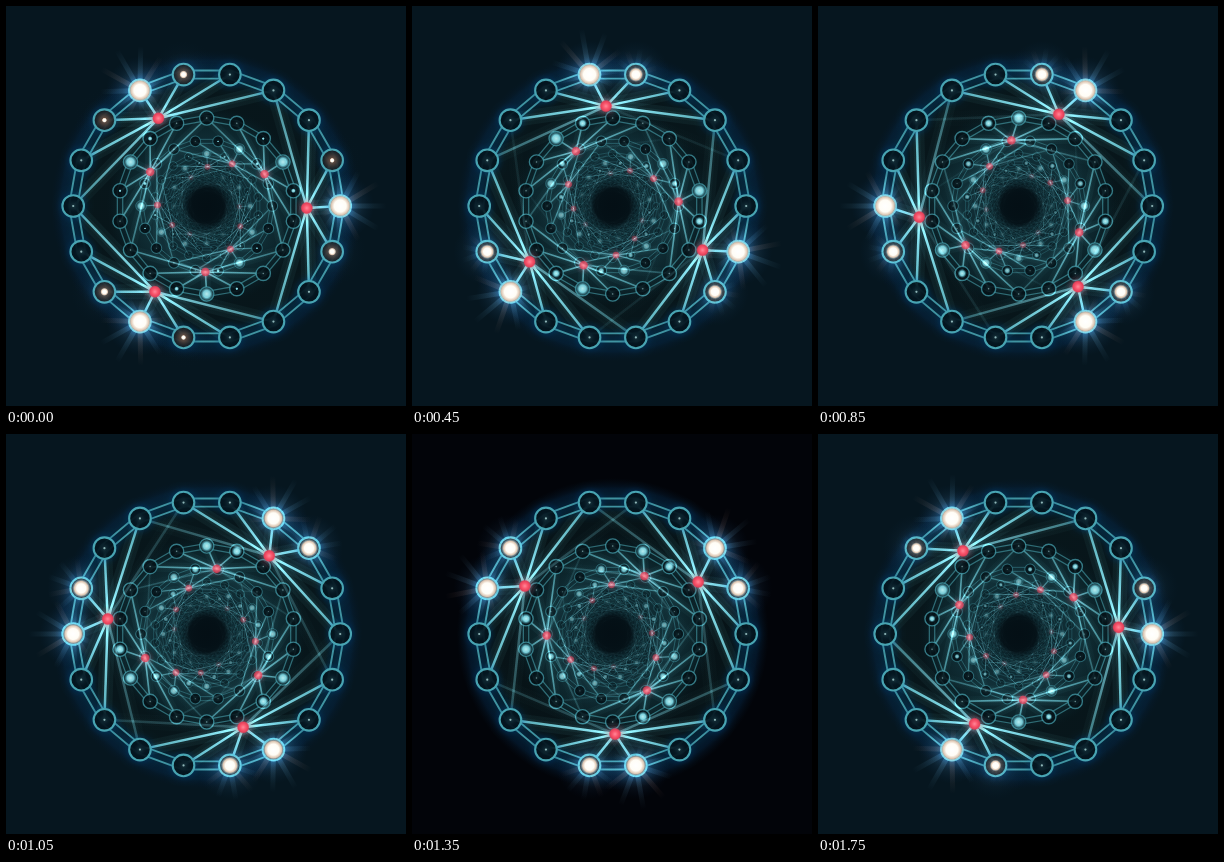
An HTML page with a canvas that plays this animation: 400x400 px, repeating every 1.8 s.

```html
<!DOCTYPE html>
<html lang="en">
<head>
<meta charset="utf-8">
<title>Node tunnel</title>
<style>
html, body { margin: 0; width: 100%; height: 100%; overflow: hidden; background: #07161f; }
canvas { display: block; width: 400px; height: 400px; }
</style>
</head>
<body>
<canvas id="stage" width="400" height="400"></canvas>
<script>
const ctx = document.getElementById('stage').getContext('2d');
const LOOP = 1800, STEP = 50, RINGS = 12, NODES = 18;
const CX = 200.7, CY = 200, RADIUS = 133.5;
const TAU = Math.PI * 2, RAD = Math.PI / 180;

// The hubs advance in ticks of 2.5 degrees, 48 per loop.
const FIRST = 1.15, TICK = 2.5, TICK_MS = 36.6, LAG = 56;

const clamp = v => Math.max(0, Math.min(1, v));
const rgba = (c, a) => `rgba(${c},${a})`;

// After a slow start of one tick per step, ticks come evenly.
function hubAngle(t) {
  const ticks = Math.max(t / STEP, Math.floor((t - LAG) / TICK_MS));
  return FIRST + TICK * ticks;
}

function at(r, deg) {
  return [CX + r * Math.cos(deg * RAD), CY + r * Math.sin(deg * RAD)];
}

// signed angle from b to a, -180..180
const gap = (a, b) => ((a - b + 180) % 360 + 360) % 360 - 180;

function disc(x, y, r, fill) {
  ctx.fillStyle = fill;
  ctx.beginPath();
  ctx.arc(x, y, r, 0, TAU);
  ctx.fill();
}

function circle(x, y, r, width, color) {
  ctx.strokeStyle = color;
  ctx.lineWidth = width;
  ctx.beginPath();
  ctx.arc(x, y, r, 0, TAU);
  ctx.stroke();
}

function polygon(r, angles, width, color) {
  ctx.strokeStyle = color;
  ctx.lineWidth = width;
  ctx.beginPath();
  angles.forEach(a => ctx.lineTo(...at(r, a)));
  ctx.closePath();
  ctx.stroke();
}

function radial(x, y, r, stops) {
  const g = ctx.createRadialGradient(x, y, 0, x, y, r);
  stops.forEach(([p, c]) => g.addColorStop(p, c));
  disc(x, y, r, g);
}

function line(x0, y0, x1, y1, width, from, to) {
  const g = ctx.createLinearGradient(x0, y0, x1, y1);
  g.addColorStop(0, from);
  g.addColorStop(1, to);
  ctx.strokeStyle = g;
  ctx.lineWidth = width;
  ctx.beginPath();
  ctx.moveTo(x0, y0);
  ctx.lineTo(x1, y1);
  ctx.stroke();
}

// soft rays, longest away from the middle of the tunnel
function flare(x, y, deg, power) {
  ctx.globalCompositeOperation = 'lighter';
  radial(x, y, 34, [[0, rgba('90,130,150', 0.6 * power)],
    [0.4, rgba('50,75,95', 0.4 * power)], [1, 'rgba(0,20,45,0)']]);
  for (let i = 0; i < 11; i++) {
    const turn = (i - 5) * 31;
    const facing = 0.5 + 0.5 * Math.cos(turn * RAD);
    const len = (20 + 26 * facing) * power;
    const a = (deg + turn) * RAD;
    const tint = i % 3 === 1 ? '140,100,85' : '80,125,150';
    line(x, y, x + len * Math.cos(a), y + len * Math.sin(a), 5,
      rgba(tint, 0.32 * power), rgba(tint, 0));
  }
  ctx.globalCompositeOperation = 'source-over';
}

function node(x, y, s, k, deg, lit) {
  const dim = 1 / (1 + 0.42 * k);
  const r = 10.8 * s;
  if (k === 0) {
    ctx.shadowColor = 'rgba(0,75,140,.75)';
    ctx.shadowBlur = 9;
  }
  disc(x, y, r, rgba('4,17,23', k < 3 ? 0.88 : 0.35));
  ctx.shadowBlur = 0;
  circle(x, y, r, Math.max(0.7, 2.1 * s), rgba('72,164,178', dim));
  if (lit > 0) {
    const power = Math.min(1, lit * 1.35);
    const core = (2 + 8 * Math.min(1, lit * 1.25)) * s;
    if (k === 0) {
      flare(x, y, deg, power);
      radial(x, y, r * 0.95, [[0, 'rgba(215,145,105,.6)'], [1, 'rgba(110,80,70,.1)']]);
      radial(x, y, core * 1.2, [[0, '#ffffff'], [0.5, '#fffdf6'],
        [0.75, 'rgba(245,215,190,.85)'], [1, 'rgba(110,170,195,0)']]);
    } else {
      const a = clamp(1.1 - 0.15 * k);
      radial(x, y, core * 1.1, [[0, rgba('190,245,248', a)],
        [0.5, rgba('125,212,224', a)], [1, 'rgba(60,150,170,0)']]);
    }
  } else if (k < 3) {
    radial(x, y, 7 * s, [[0, rgba('45,85,92', 0.5 * dim)], [1, 'rgba(10,30,40,0)']]);
    disc(x, y, 1.1 * s, rgba('175,215,215', 0.8 * dim));
  }
}

function hub(x, y, s, k) {
  const a = clamp(1 - 0.22 * k);
  const r = 6.3 * Math.pow(s, 0.7);
  radial(x, y, r * 2.1, [[0, rgba('215,100,120', 0.6 * a)], [1, 'rgba(90,50,65,0)']]);
  radial(x, y, r, [[0, rgba('255,135,152', a)], [0.45, rgba('250,85,108', a)],
    [0.8, rgba('225,65,90', a)], [1, rgba('200,60,85', 0.1 * a)]]);
}

function ring(k, lead) {
  // perspective: equal steps in depth
  const s = 1 / (1 + 0.517 * k);
  const r = RADIUS * s;
  const dim = 1 / (1 + 0.5 * k);
  const base = lead - 30 * k;
  const hubs = [0, 120, 240].map(d => base + d);
  const nodes = Array.from({ length: NODES }, (_, i) => i * 20 + (k % 2) * 10);

  if (k === 0) {
    ctx.shadowColor = 'rgba(0,75,140,.7)';
    ctx.shadowBlur = 9;
  }
  for (const side of [-1, 1]) {
    polygon(r * (1 + 0.031 * side), nodes, Math.max(0.7, 1.9 * s), rgba('72,160,172', 0.9 * dim));
  }
  ctx.shadowBlur = 0;

  ctx.globalCompositeOperation = 'lighter';
  for (const h of hubs) {
    const [hx, hy] = at(r * 0.75, h);
    for (const n of nodes) {
      const w = clamp((76 - Math.abs(gap(n, h))) / 18);
      if (!w) continue;
      const [nx, ny] = at(r, n);
      if (k < 3) {
        for (const glow of [15, 7]) {
          line(hx, hy, nx, ny, glow * s, rgba('60,120,128', 0.12 * w * dim),
            rgba('45,85,80', 0.1 * w * dim));
        }
      }
      line(hx, hy, nx, ny, Math.max(0.7, 2.5 * s), rgba('145,215,224', 0.9 * w * dim),
        rgba('85,160,168', 0.8 * w * dim));
    }
  }
  ctx.globalCompositeOperation = 'source-over';

  for (const n of nodes) {
    const near = Math.min(...hubs.map(h => Math.abs(gap(n, h))));
    const [x, y] = at(r, n);
    node(x, y, s, k, n, clamp((21.5 - near) / 18));
  }
  for (const h of hubs) hub(...at(r * 0.75, h), s, k);
}

function draw(t) {
  const lead = hubAngle(t);
  const dark = clamp((t - 1050) / 150) * clamp((1650 - t) / 150);
  const mix = (a, b) => Math.round(a + (b - a) * dark);
  ctx.fillStyle = `rgb(${mix(6, 2)},${mix(22, 4)},${mix(31, 9)})`;
  ctx.fillRect(0, 0, 400, 400);

  radial(CX, CY, 156, [[0, 'rgba(8,22,26,.85)'], [0.78, 'rgba(8,22,26,.85)'],
    [0.86, 'rgba(5,34,50,.75)'], [0.93, 'rgba(5,34,62,.55)'], [1, 'rgba(5,22,38,0)']]);
  radial(CX, CY, 100, [[0, 'rgba(3,12,18,0)'], [0.2, 'rgba(18,54,64,.5)'],
    [0.6, 'rgba(24,66,76,.6)'], [0.86, 'rgba(14,46,54,.5)'], [1, 'rgba(8,30,38,0)']]);

  for (let k = RINGS - 1; k >= 0; k--) {
    ring(k, lead);
    if (k === 5) {
      radial(CX, CY, 34, [[0, 'rgba(4,15,21,1)'], [0.52, 'rgba(4,16,22,.92)'],
        [0.72, 'rgba(6,24,30,.5)'], [1, 'rgba(10,35,42,0)']]);
    }
  }
}

const start = performance.now();
function tick(now) {
  const t = Math.max(0, now - start) % LOOP;
  draw(Math.floor(t / STEP) * STEP);
  requestAnimationFrame(tick);
}
draw(0);
requestAnimationFrame(tick);
</script>
</body>
</html>
```
